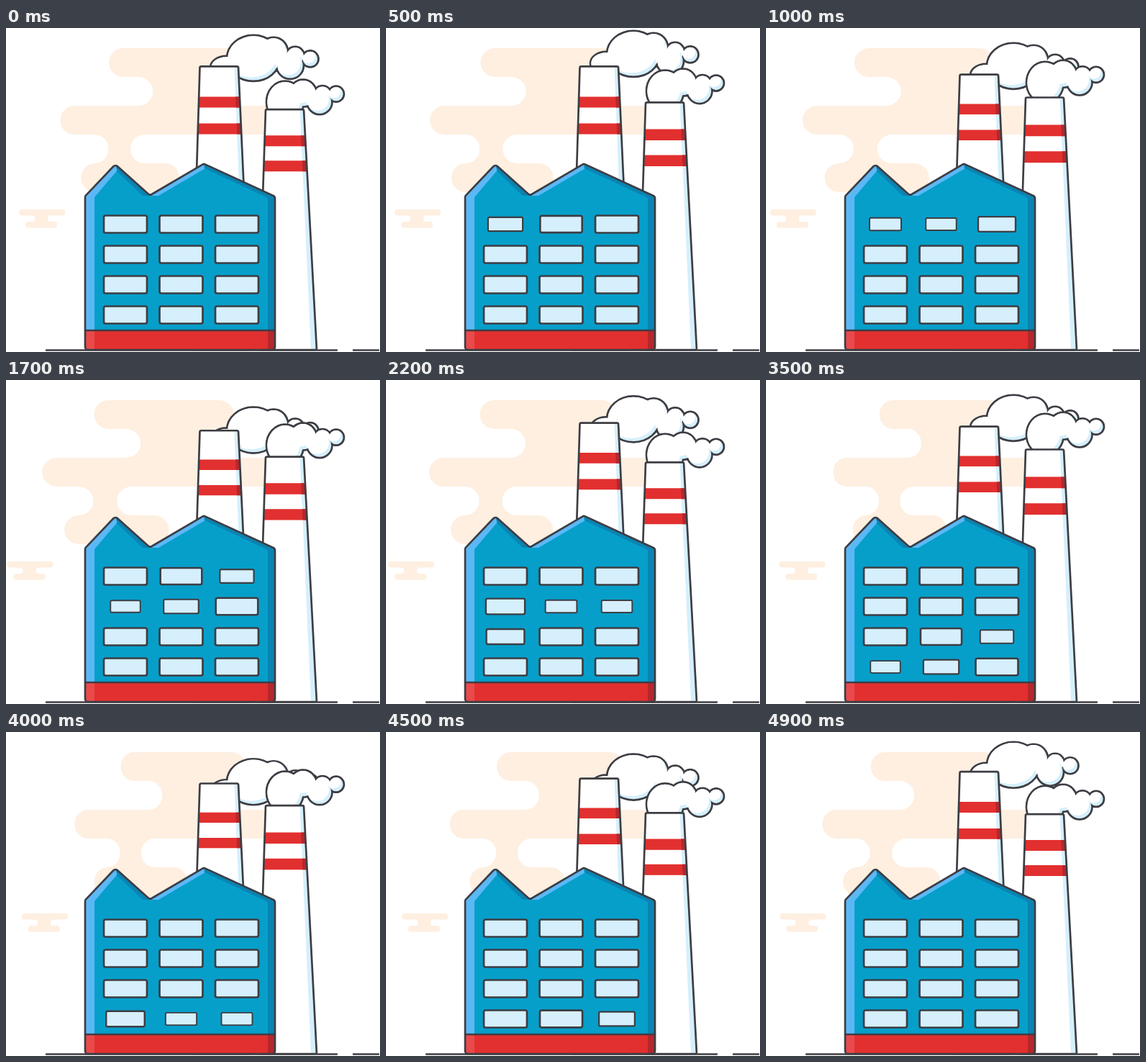
Animation of 520x450 px, one loop 5000 ms. Source, as an HTML page with a canvas:

```html
<!DOCTYPE html>
<html lang="en">
<head>
<meta charset="utf-8">
<title>Factory</title>
<style>
html, body { margin: 0; width: 100%; height: 100%; overflow: hidden; background: #fff; }
canvas { display: block; }
</style>
</head>
<body>
<canvas id="stage" width="520" height="450"></canvas>
<script>
const ctx = document.getElementById('stage').getContext('2d');
const INK = '#3d3d43', RED = '#e1302f', DARK_RED = '#b5272c', PALE = '#d5effc', PEACH = '#feefe0';
const LIGHT_BLUE = '#5cb8f5', BLUE = '#069fca', DARK_BLUE = '#0a84b2';
const LOOP = 5000, HALF = LOOP / 2, GROUND = 447, LINE = 2.7;

// Swings around mid and is smallest at time low.
const wave = (t, period, mid, amp, low) => mid - amp * Math.cos(2 * Math.PI * (t - low) / period);

// Closed polygon with rounded corners, from a flat list of coordinates.
function poly(xy, r = 0) {
  const p = new Path2D(), n = xy.length;
  p.moveTo((xy[0] + xy[n - 2]) / 2, (xy[1] + xy[n - 1]) / 2);
  for (let i = 0; i < n; i += 2) p.arcTo(xy[i], xy[i + 1], xy[(i + 2) % n], xy[(i + 3) % n], r);
  p.closePath();
  return p;
}

// Flat cloud: stacked rows of height h, each from its left to its right end.
function rows(lefts, rights, top, h) {
  const right = rights.flatMap((x, i) => [x, top + i * h, x, top + (i + 1) * h]);
  const left = lefts.flatMap((x, i) => [[x, top + i * h], [x, top + (i + 1) * h]]).reverse().flat();
  return poly([...right, ...left], h / 2 - 0.4);
}

// Puffy cloud: union of ellipses given as [x, y, rx, ry].
function puffs(list) {
  const p = new Path2D();
  for (const [x, y, rx, ry = rx] of list) {
    p.moveTo(x + rx - LINE / 2, y);
    p.ellipse(x, y, rx - LINE / 2, ry - LINE / 2, 0, 0, 2 * Math.PI);
  }
  return p;
}

function box(x, y, w, h, r = 0) {
  const p = new Path2D();
  p.roundRect(x, y, w, h, r);
  return p;
}

function fill(path, color) {
  ctx.fillStyle = color;
  ctx.fill(path);
}

function outline(path, width = LINE) {
  ctx.strokeStyle = INK;
  ctx.lineWidth = width;
  ctx.stroke(path);
}

function within(path, draw) {
  ctx.save();
  ctx.clip(path);
  draw();
  ctx.restore();
}

const bigCloud = rows([142, 203, 74, 141, 103], [325, 280, 385, 172, 240], 28, 40);
const smallCloud = rows([0, 22, 9], [64, 40, 53], 252, 8.5);

function background(t) {
  const pivot = 460;
  ctx.save();
  ctx.translate(pivot, 0);
  ctx.scale((pivot - wave(t, LOOP, 72, 23.7, 1370)) / (pivot - 74), 1);
  ctx.translate(-pivot, 0);
  fill(bigCloud, PEACH);
  ctx.restore();

  ctx.save();
  ctx.translate(wave(t, LOOP, 12, 10.5, 1750), 0);
  fill(smallCloud, PEACH);
  ctx.restore();
}

const leftSmoke = puffs([[306, 54, 22, 16], [344, 41, 37, 32], [372, 32, 20], [402, 38, 13], [395, 51, 19], [423, 42, 11.5]]);
const rightSmoke = puffs([[388, 104, 26, 29], [413, 92, 19], [440, 94, 12.5], [436, 104, 17.5], [459, 93, 11]]);

function smoke(path, dy) {
  ctx.save();
  ctx.translate(0, dy);
  outline(path, 2 * LINE);
  fill(path, PALE);
  within(path, () => {
    ctx.translate(-3, -4);
    fill(path, '#fff');
  });
  ctx.restore();
}

// The stack stretches upwards from the ground; rest is its unscaled top.
function chimney(top, rest, [x0, x1, x2, x3], bands) {
  const y = v => GROUND - (GROUND - v) * (GROUND - top) / (GROUND - rest);
  const body = poly([x0, top, x1, top, x2, GROUND, x3, GROUND], 2);
  const shade = poly([x1 - 5.5, top, x1, top, x2, GROUND, x2 - 8, GROUND]);
  const stripes = color => {
    for (const b of bands) fill(box(x3, y(b), x2 - x3, y(b + 15) - y(b)), color);
  };
  fill(body, '#fff');
  within(body, () => {
    fill(shade, PALE);
    stripes(RED);
    within(shade, () => stripes(DARK_RED));
  });
  outline(body);
}

const hall = poly([110, 447, 110, 233.5, 152, 189.5, 200, 232.5, 275, 188.5, 374, 234, 374, 447], 4);
const facets = [
  [[110, 447, 110, 233, 152, 190, 157, 195, 123, 235, 123, 447], LIGHT_BLUE],
  [[196, 233, 275, 189, 282, 192, 212, 233], LIGHT_BLUE],
  [[152, 189, 201, 233, 190, 233, 155, 200], DARK_BLUE],
  [[275, 188, 374, 234, 374, 447, 364, 447, 364, 236, 276, 195], DARK_BLUE]
].map(([xy, color]) => [poly(xy), color]);

// Windows shrink and grow back one after another.
function pane(t, row, col) {
  const u = (t - 815 - 910 * row - 300 * col) / 760;
  const s = Math.abs(u) < 1 ? 1 - 0.155 * (1 + Math.cos(Math.PI * u)) : 1;
  const w = 60 * s, h = 24 * s;
  const p = box(166 + 77.5 * col - w / 2, 272.5 + 42 * row - h / 2, w, h, 2.5 * s);
  fill(p, PALE);
  outline(p, LINE * s);
}

function building(t) {
  fill(hall, BLUE);
  within(hall, () => {
    for (const [path, color] of facets) fill(path, color);
    fill(box(110, 420, 264, 28), RED);
    fill(box(110, 420, 13, 28), '#ea4a4c');
    fill(box(364, 420, 10, 28), DARK_RED);
  });
  outline(new Path2D('M110 420H374'), 2.4);
  outline(hall);
  for (let row = 0; row < 4; row++)
    for (let col = 0; col < 3; col++) pane(t, row, col);
}

function draw() {
  const t = Math.floor(performance.now() / 100) * 100 % LOOP;
  ctx.clearRect(0, 0, 520, 450);
  ctx.lineJoin = ctx.lineCap = 'round';
  background(t);
  smoke(leftSmoke, wave(t, HALF, 11.5, 17.5, 368));
  chimney(wave(t, HALF, 61.5, 10, 250), 54, [269.5, 323, 341, 257.5], [96, 133]);
  smoke(rightSmoke, wave(t, HALF, -14, 14.3, 1056));
  chimney(wave(t, HALF, 105.5, 9, 1028), 114, [361, 414, 432, 350], [150, 185]);
  building(t);
  outline(new Path2D('M56 447.5H460M483 447.5H518'), 2.4);
  requestAnimationFrame(draw);
}
draw();
</script>
</body>
</html>
```
